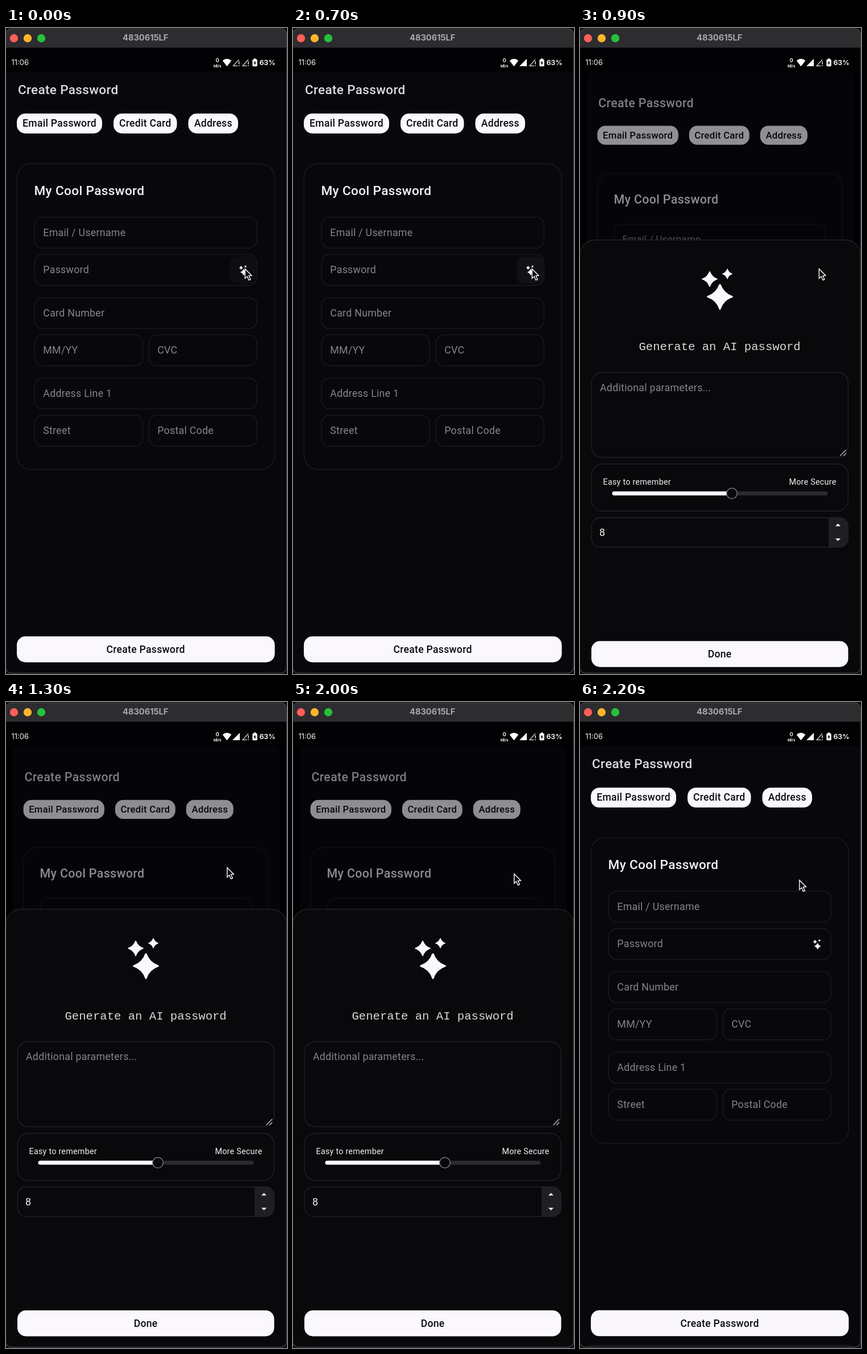
An HTML page with a canvas that plays this animation: 494 by 1133 pixels, repeating every 2.3 s.

```html
<!DOCTYPE html>
<html lang="en">
<head>
<meta charset="utf-8">
<title>Create Password</title>
<style>
  html, body { margin: 0; width: 100%; height: 100%; overflow: hidden; background: #0d0c14; }
  canvas { display: block; width: 494px; height: 1133px; }
</style>
</head>
<body>
<canvas id="stage" width="494" height="1133"></canvas>
<script>
const W = 494, H = 1133, LOOP = 2300, STEP = 100;
const ctx = document.getElementById('stage').getContext('2d');

const COLOR = {
  page: '#08070b', sheet: '#09080b', line: '#1d1c20', light: '#faf8fd',
  ink: '#0b0a0e', hint: '#86858b', heading: '#dbdadd'
};
const SHEET_TOP = 363.5, SHEET_TRAVEL = H - SHEET_TOP;

// Cursor tip: time, x, y
const CURSOR = [
  [0, 419.5, 421], [1000, 418, 405], [1100, 410, 364], [1200, 396, 312],
  [1300, 388, 289], [1900, 388, 295], [2000, 388, 300], [2100, 387, 305], [2200, 385, 311]
];

// cubic-bezier(.32, .72, 0, 1)
function ease(x) {
  if (x <= 0) return 0;
  if (x >= 1) return 1;
  let lo = 0, hi = 1, u = 0.5;
  for (let i = 0; i < 30; i++) {
    u = (lo + hi) / 2;
    const bx = 0.96 * (1 - u) ** 2 * u + u ** 3;
    if (bx < x) lo = u; else hi = u;
  }
  return 2.16 * (1 - u) ** 2 * u + 3 * (1 - u) * u * u + u ** 3;
}

const openness = t => t < 1500 ? ease((t - 753.7) / 205.6) : 1 - ease((t - 2041) / 205.6);

function box(x0, y0, x1, y1, r, fill, stroke) {
  ctx.beginPath();
  ctx.roundRect(x0, y0, x1 - x0, y1 - y0, r);
  if (fill) { ctx.fillStyle = fill; ctx.fill(); }
  if (stroke) { ctx.strokeStyle = stroke; ctx.lineWidth = 1.3; ctx.stroke(); }
}

function poly(points, fill, stroke, width = 1) {
  ctx.beginPath();
  points.forEach(([x, y]) => ctx.lineTo(x, y));
  ctx.closePath();
  if (fill) { ctx.fillStyle = fill; ctx.fill(); }
  if (stroke) { ctx.strokeStyle = stroke; ctx.lineWidth = width; ctx.stroke(); }
}

function line(x0, y0, x1, y1, color, width = 1) {
  ctx.beginPath();
  ctx.moveTo(x0, y0);
  ctx.lineTo(x1, y1);
  ctx.strokeStyle = color;
  ctx.lineWidth = width;
  ctx.stroke();
}

function disc(x, y, r, fill, stroke) {
  ctx.beginPath();
  ctx.arc(x, y, r, 0, Math.PI * 2);
  ctx.fillStyle = fill;
  ctx.fill();
  if (stroke) { ctx.strokeStyle = stroke; ctx.lineWidth = 1.5; ctx.stroke(); }
}

// y is the middle of the capital letters
function text(str, x, y, size, color, { weight = 400, align = 'left', font = 'Roboto, sans-serif', track = 0.015 } = {}) {
  ctx.font = `${weight} ${size}px ${font}`;
  ctx.letterSpacing = `${size * track}px`;
  ctx.textAlign = align;
  ctx.fillStyle = color;
  ctx.fillText(str, x, y + size * 0.356);
}

function star(x, y, r, color) {
  const c = r * 0.25;
  ctx.beginPath();
  ctx.moveTo(x, y - r);
  ctx.quadraticCurveTo(x + c, y - c, x + r, y);
  ctx.quadraticCurveTo(x + c, y + c, x, y + r);
  ctx.quadraticCurveTo(x - c, y + c, x - r, y);
  ctx.quadraticCurveTo(x - c, y - c, x, y - r);
  ctx.fillStyle = ctx.strokeStyle = color;
  ctx.lineJoin = 'round';
  ctx.lineWidth = r * 0.13;
  ctx.fill();
  ctx.stroke();
}

function sparkles(x, y, scale) {
  ctx.save();
  ctx.translate(x, y);
  ctx.scale(scale, scale);
  star(5, 13, 21.5, COLOR.light);
  star(-13, -18, 13, COLOR.light);
  star(18, -27, 8.5, COLOR.light);
  ctx.restore();
}

function field(x0, x1, y, label) {
  box(x0, y, x1, y + 54.3, 14, null, COLOR.line);
  text(label, x0 + 15, y + 26.7, 17.8, COLOR.hint);
}

function button(label, x0, x1, y) {
  box(x0, y, x1, y + 45.5, 15, COLOR.light);
  text(label, 245.6, y + 22.5, 17.6, COLOR.ink, { weight: 500, align: 'center' });
}

function page(t, p) {
  const s = 1 - 0.051 * p;
  ctx.save();
  ctx.translate(245.75 * (1 - s), 29.4 * p);
  ctx.scale(s, s);
  box(-1, 51, W, H + 60, 9 * p, COLOR.page);
  text('Create Password', 21, 108, 22.5, COLOR.heading, { weight: 500 });
  [['Email Password', 19, 169], ['Credit Card', 189, 300.5], ['Address', 320.5, 408]].forEach(([label, x0, x1]) => {
    box(x0, 150, x1, 185, 15, COLOR.light);
    text(label, (x0 + x1) / 2, 167, 17.6, COLOR.ink, { weight: 500, align: 'center' });
  });

  box(19.3, 238, 472.3, 774.5, 25, null, COLOR.line);
  text('My Cool Password', 49.5, 285.3, 22.6, '#f3f2f5', { weight: 500 });
  field(50.3, 441.2, 331.8, 'Email / Username');
  field(50.3, 441.2, 397.2, 'Password');
  field(50.3, 441.2, 472.8, 'Card Number');
  field(50.3, 240.3, 538.2, 'MM/YY');
  field(251.2, 441.2, 538.2, 'CVC');
  field(50.3, 441.2, 613.8, 'Address Line 1');
  field(50.3, 240.3, 679.2, 'Street');
  field(251.2, 441.2, 679.2, 'Postal Code');
  if (t < 800) box(393.5, 401, 440.5, 448, 12, t < 100 ? '#0e0d12' : '#121116');
  sparkles(416.5, 425, 0.25);
  button('Create Password', 19, 472.5, 1067);
  ctx.restore();
}

function sheet(p) {
  ctx.save();
  ctx.translate(0, SHEET_TRAVEL * (1 - p));
  box(-0.5, SHEET_TOP, 493.5, H + 40, [27, 27, 0, 0], COLOR.sheet, '#242328');
  sparkles(241, 450, 1);
  text('Generate an AI password', 245.6, 549.5, 20.6, '#d9d8db',
    { align: 'center', font: '"Liberation Mono", monospace', track: 0 });

  box(20.3, 595.5, 471.3, 745, 19, null, '#222126');
  text('Additional parameters...', 35, 622, 17.8, COLOR.hint);
  line(457.5, 742, 468, 731.5, '#c9c8cc', 1.2);
  line(463.5, 742, 468, 737.5, '#c9c8cc', 1.2);

  box(20.3, 756.5, 471.3, 839, 19, null, '#222126');
  text('Easy to remember', 40.5, 787.7, 14.4, '#efeef1');
  text('More Secure', 450.5, 787.7, 14.4, '#efeef1', { align: 'right' });
  box(56.5, 804.5, 435.5, 811.5, 3.5, '#2b2a2f');
  box(56.5, 804.5, 267, 811.5, 3.5, COLOR.light);
  disc(267, 808, 9.3, COLOR.sheet, '#77767c');

  box(437, 850.5, 471.3, 902.3, [0, 15, 15, 0], '#1f1e22');
  box(20.3, 850.5, 471.3, 902.3, 15, null, '#222126');
  text('8', 34, 876.5, 18, '#efeef1');
  poly([[449, 865.5], [458, 865.5], [453.5, 861]], COLOR.light);
  poly([[449, 887], [458, 887], [453.5, 891.5]], COLOR.light);
  button('Done', 20, 471.5, 1067);
  ctx.restore();
}

function signal(x, full) {
  if (full) return poly([[x, 67], [x + 13, 54], [x + 13, 67]], '#fff');
  ctx.beginPath();
  ctx.moveTo(x + 11.5, 55.5);
  ctx.lineTo(x + 1.5, 66.3);
  ctx.lineTo(x + 9, 66.3);
  ctx.strokeStyle = '#dddddf';
  ctx.lineWidth = 1.2;
  ctx.stroke();
  line(x + 11.6, 58.5, x + 11.6, 63.6, '#fff', 1.4);
  line(x + 11.6, 65.2, x + 11.6, 66.9, '#fff', 1.4);
}

function statusBar(t) {
  const inter = { font: 'Inter, sans-serif', track: 0 };
  ctx.fillStyle = '#020204';
  ctx.fillRect(0, 34, W, 43.5);
  text('11:06', 9.5, 60.5, 13, '#f4f4f5', inter);
  text('0', 371.7, 57, 9.5, '#fff', { ...inter, weight: 600, align: 'center' });
  text('kB/s', 371.7, 66.3, 6.2, '#fff', { ...inter, weight: 700, align: 'center' });

  ctx.beginPath();
  ctx.moveTo(388.5, 67.3);
  ctx.lineTo(380.7, 57.3);
  ctx.quadraticCurveTo(388.5, 50.7, 396.3, 57.3);
  ctx.closePath();
  ctx.fillStyle = '#fff';
  ctx.fill();

  signal(398, t >= 100);
  signal(414.5, false);
  box(435.7, 53.5, 439.3, 56, 0.5, '#fff');
  box(433.3, 55, 441.7, 67.3, 1.5, '#fff');
  poly([[438.2, 57], [435.2, 62], [437, 62], [436.8, 65.5], [439.8, 60.4], [438, 60.4]], '#08070b');
  text('63%', 473.7, 60.5, 12.4, '#fff', { ...inter, weight: 600, align: 'right' });
}

function titleBar() {
  ctx.fillStyle = '#2d2c2f';
  ctx.fillRect(0, 0, W, 34.5);
  ['#fe5f58', '#fdb52b', '#26c13c'].forEach((color, i) => disc(14 + 24 * i, 18, 7.2, color));
  text('4830615LF', 245.2, 17.3, 14.6, '#a9a8ab',
    { weight: 700, align: 'center', font: 'Inter, sans-serif', track: 0 });
}

function cursor(t) {
  const [, x, y] = CURSOR.filter(k => k[0] <= t).pop();
  ctx.save();
  ctx.translate(x, y);
  ctx.lineJoin = 'miter';
  poly([[0.8, 1.5], [0.8, 18.2], [4.6, 14.6], [7.4, 21.2], [10.3, 20], [7.5, 13.5], [12.3, 13.2]],
    '#08080a', '#fff', 1.4);
  ctx.restore();
}

function draw(t) {
  const p = openness(t);
  ctx.fillStyle = '#0d0c14';
  ctx.fillRect(0, 0, W, H);
  ctx.save();
  ctx.beginPath();
  ctx.roundRect(0, 1, 493.5, 1131, 10);
  ctx.clip();
  ctx.fillStyle = '#000';
  ctx.fillRect(0, 0, W, H);
  page(t, p);
  ctx.fillStyle = `rgba(0, 0, 8, ${0.43 * p})`;
  ctx.fillRect(0, 0, W, H);
  if (p > 0) sheet(p);
  statusBar(t);
  titleBar();
  ctx.restore();
  box(-0.5, 1.5, 493.3, 1131.5, 10, null, '#403f45');
  cursor(t);
}

function tick() {
  const t = performance.now() % LOOP;
  draw(Math.floor(t / STEP) * STEP);
  requestAnimationFrame(tick);
}
tick();
</script>
</body>
</html>
```
